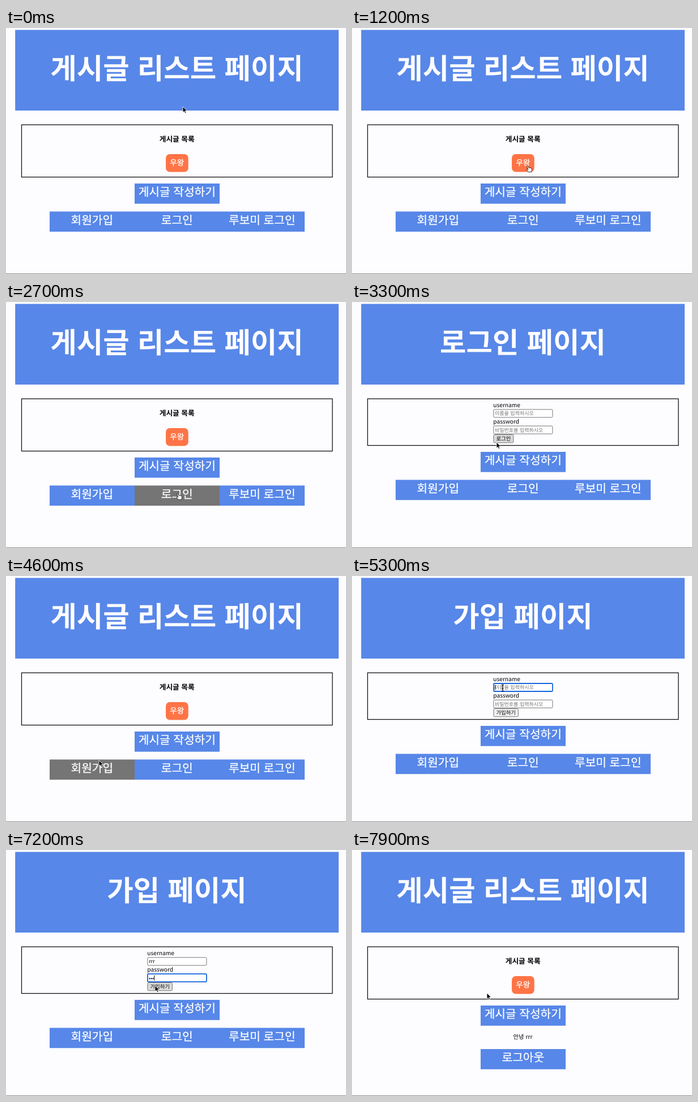
Recreate the animation shown at these times as an HTML page. Size 600x435 px, loop 8000 ms.

```html
<!DOCTYPE html>
<html lang="ko">
<head>
<meta charset="utf-8">
<title>게시판</title>
<style>
html, body { margin: 0; width: 100%; height: 100%; overflow: hidden; background: #fdfcff; }
svg { display: block; width: 600px; height: 435px; }
text { font-family: "Noto Sans CJK KR", "Noto Sans CJK", "Noto Sans", sans-serif; text-rendering: geometricPrecision; }
.mid { text-anchor: middle; }
.title { font-size: 50.5px; font-weight: 700; fill: #fdfcff; }
.nav rect { fill: #5787e8; }
.nav.over rect { fill: #757575; }
.nav text { font-size: 20.3px; fill: #fff; stroke: #fff; stroke-width: .25px; }
.head { font-size: 12.7px; font-weight: 700; }
.post { font-size: 13.6px; fill: #fff; stroke: #fff; stroke-width: .25px; }
.label { font-size: 10.2px; }
.hello { font-size: 10.3px; }
.field rect { fill: #fff; stroke: #767676; }
.field.focus rect { stroke: #1564dc; stroke-width: 1.8px; }
.field text { font-size: 9px; }
.field .hint { fill: #757575; }
.caret { stroke: #000; }
.btn rect { fill: #efefef; stroke: #767676; }
.btn.over rect { fill: #dadada; }
.btn text { font-size: 9.4px; }
.hide { display: none; }
</style>
</head>
<body>
<svg viewBox="0 0 600 435">
  <rect width="600" height="435" fill="#fdfcff"/>
  <rect x="16.2" y="3.4" width="570.8" height="142.6" fill="#5787e8"/>
  <text id="title" class="title mid" x="301.5" y="90"></text>
  <rect id="frame" x="27.5" y="171.2" width="548.5" fill="none" stroke="#111" stroke-width="1.3"/>

  <g id="list">
    <text class="head mid" x="301.7" y="200.5">게시글 목록</text>
    <rect x="282" y="223" width="39.7" height="31.5" rx="7" fill="#ff7446"/>
    <text class="post mid" x="301.7" y="242.7">우왕</text>
  </g>

  <g id="form">
    <text class="label" x="249.3" y="185.5">username</text>
    <g id="user" class="field">
      <rect x="249.9" y="190" width="104" height="14" rx="1.5"/>
      <text class="hint" x="252" y="200.3">이름을 입력하시오</text>
      <text class="value" x="252" y="200.3"></text>
      <path class="caret" d="M0 192.5v9"/>
    </g>
    <text class="label" x="249.3" y="214.5">password</text>
    <g id="pass" class="field">
      <rect x="249.9" y="219.2" width="104" height="14" rx="1.5"/>
      <text class="hint" x="252" y="229.5">비밀번호를 입력하시오</text>
      <text class="value" x="252" y="229.5"></text>
      <path class="caret" d="M0 221.7v9"/>
    </g>
    <g id="send" class="btn">
      <rect x="249.9" y="234.5" height="14.3" rx="2"/>
      <text class="mid" y="245.1"></text>
    </g>
  </g>

  <g id="links"></g>
  <text id="hello" class="hello mid" x="301.5" y="334.3">안녕 rrr</text>
  <rect y="434" width="600" height="1" fill="#8b8b8d"/>

  <g id="cursor" stroke-linejoin="round">
    <path id="arrow" transform="scale(.93)" d="M0 0V11.2L2.6 8.8L4.4 12.6L6.3 11.7L4.6 8H8.2Z" fill="#000" stroke="#fff" stroke-width=".9"/>
    <path id="hand" transform="translate(-1 .8) scale(.92)" d="M-1.6 .4Q-1 -1 .3 .1L2.6 4.2Q3.4 3 4.4 3.9Q5.4 3 6.2 4Q7.4 3.6 7.7 5L8.1 8.2L7.4 11.8H1.8L-1.8 8.1Q-2.8 6.4-.9 6.3L.8 7.2Z" fill="#fff" stroke="#000" stroke-width=".9"/>
    <path id="beam" d="M-2 -6Q0 -6 0 -4.5Q0 -6 2 -6M0 -4.5V4.5M-2 6Q0 6 0 4.5Q0 6 2 6M-1.2 1.5H1.2" fill="none" stroke="#000" stroke-width="1.1"/>
  </g>
</svg>
<script>
const LOOP = 8000, STEP = 100;
const LINK_W = 150, LINK_H = 35.7;
const $ = id => document.getElementById(id);
const show = (el, on) => el.classList.toggle('hide', !on);

const titles = { list: '게시글 리스트 페이지', login: '로그인 페이지', join: '가입 페이지', home: '게시글 리스트 페이지' };
const pages = [[0, 'list'], [1300, 'login'], [1900, 'list'], [2900, 'login'], [3900, 'list'], [4700, 'join'], [7500, 'home']];

// Pointer stops: time, x, y
const stops = [
  [0, 312, 139], [100, 312, 139], [900, 311, 243], [2000, 311, 243],
  [2600, 304, 338], [2900, 304, 338], [3300, 255, 248], [3900, 255, 248],
  [4600, 164, 326], [4800, 164, 326], [5000, 266, 198], [5700, 266, 198],
  [6100, 268, 223], [6900, 268, 223], [7300, 262, 243], [7500, 262, 243], [7900, 238, 253]
];

const svgEl = (tag, attrs, parent) => {
  const el = document.createElementNS('http://www.w3.org/2000/svg', tag);
  for (const k in attrs) el.setAttribute(k, attrs[k]);
  return parent.appendChild(el);
};

function makeLink(label, x, y, guest, member) {
  const el = svgEl('g', { class: 'nav' }, $('links'));
  svgEl('rect', { x, y, width: LINK_W, height: LINK_H }, el);
  svgEl('text', { class: 'mid', x: x + LINK_W / 2 - .2, y: y + 22.2 }, el).textContent = label;
  return { el, x, y, guest, member };
}
const links = [
  makeLink('게시글 작성하기', 227, 275, true, true),
  makeLink('회원가입', 77, 324.5, true, false),
  makeLink('로그인', 227, 324.5, true, false),
  makeLink('루보미 로그인', 377, 324.5, true, false),
  makeLink('로그아웃', 227, 352, false, true)
];

function pointer(t) {
  const i = stops.findIndex(s => s[0] > t);
  if (i < 0) return stops[stops.length - 1].slice(1);
  const [t0, x0, y0] = stops[i - 1], [t1, x1, y1] = stops[i];
  const p = (t - t0) / (t1 - t0), e = p * p * (3 - 2 * p);
  return [x0 + (x1 - x0) * e, y0 + (y1 - y0) * e];
}

const typed = (t, start, char) => char.repeat(Math.max(0, Math.min(3, Math.floor((t - start) / 200) + 1)));

function setField(id, value, focus) {
  const el = $(id), text = el.querySelector('.value'), caret = el.querySelector('.caret');
  el.classList.toggle('focus', focus);
  text.textContent = value;
  show(el.querySelector('.hint'), !value);
  show(caret, focus);
  const w = value ? text.getComputedTextLength() : 0;
  caret.setAttribute('transform', `translate(${252.5 + w} 0)`);
}

function draw(t) {
  const page = pages.filter(p => p[0] <= t).pop()[1];
  const form = page === 'login' || page === 'join', member = page === 'home', join = page === 'join';
  const [x, y] = pointer(t), lift = form ? 10 : 0;
  const inside = (l, top, w, h) => x >= l && x <= l + w && y >= top && y <= top + h;

  $('title').textContent = titles[page];
  $('frame').setAttribute('height', form ? 82.4 : 92.4);
  show($('list'), !form);
  show($('form'), form);
  show($('hello'), member);
  $('links').setAttribute('transform', `translate(0 ${-lift})`);

  let hand = !form && inside(282, 223, 40, 31.5) && (t < 1300 || t > 2000);
  for (const k of links) {
    const on = member ? k.member : k.guest;
    const over = on && inside(k.x, k.y - lift, LINK_W, LINK_H);
    show(k.el, on);
    k.el.classList.toggle('over', over);
    if (over && y > k.y - lift + 5 && !form) hand = true;
  }

  let beam = false;
  if (form) {
    const w = join ? 43.5 : 35, send = $('send'), label = send.querySelector('text');
    send.querySelector('rect').setAttribute('width', w);
    label.setAttribute('x', 249.9 + w / 2);
    label.textContent = join ? '가입하기' : '로그인';
    send.classList.toggle('over', inside(249.9, 234.5, w, 14.3));
    setField('user', join ? typed(t, 5500, 'r') : '', join && t >= 5300 && t < 6300);
    setField('pass', join ? typed(t, 6400, '•') : '', join && t >= 6300 && t < 7300);
    beam = inside(249.9, 190, 104, 14) || inside(249.9, 219.2, 104, 14);
  }

  show($('hand'), hand);
  show($('beam'), beam);
  show($('arrow'), !hand && !beam);
  $('cursor').setAttribute('transform', `translate(${x} ${y})`);
}

function tick() {
  draw(Math.floor(performance.now() % LOOP / STEP) * STEP);
  requestAnimationFrame(tick);
}
tick();
</script>
</body>
</html>
```
